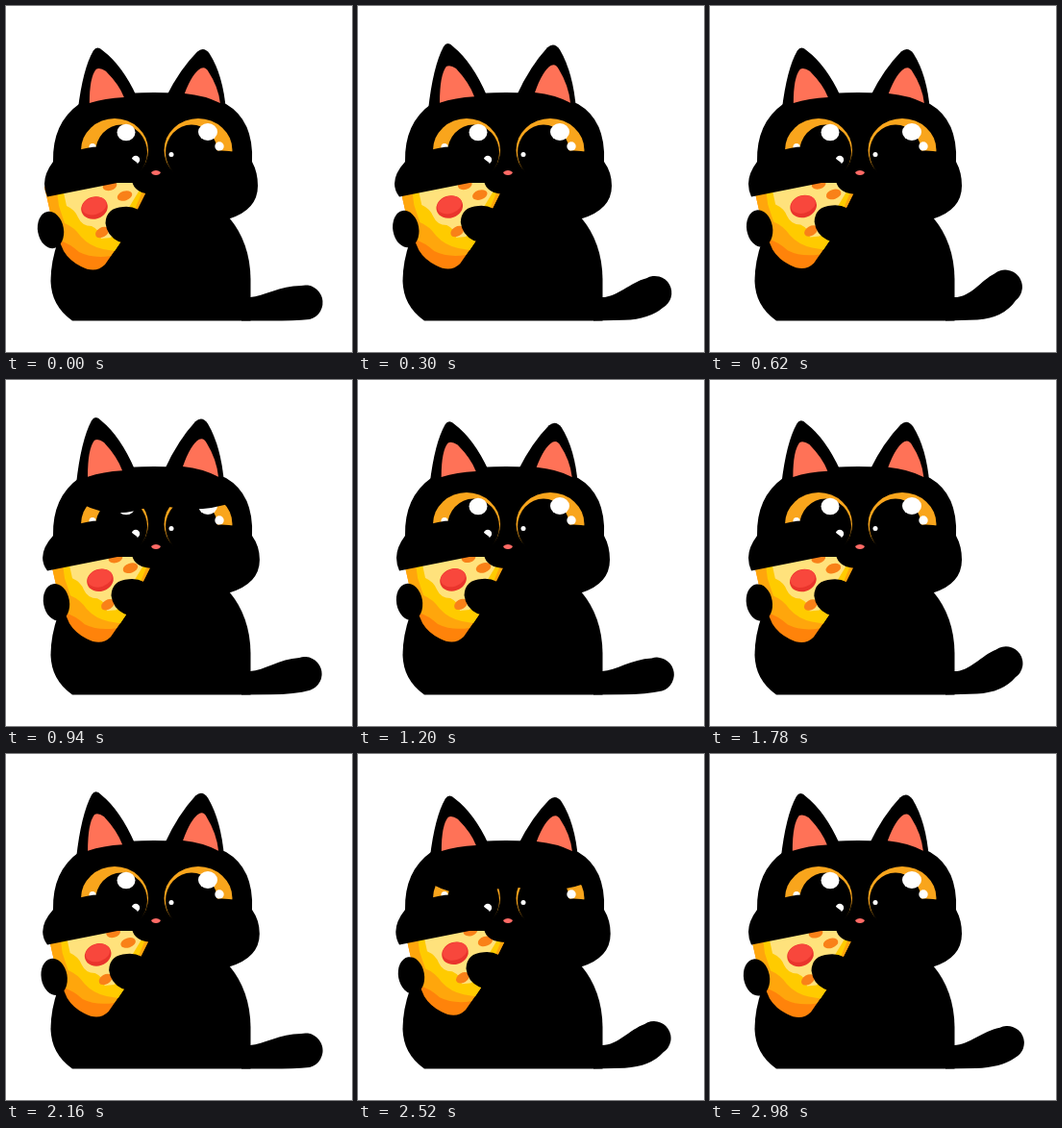
An HTML page that plays this animation: 360 px wide and 360 px high, repeating every 3 s.

```html
<!DOCTYPE html>
<html>
<head>
<meta charset="utf-8">
<style>
html, body { margin: 0; width: 100%; height: 100%; overflow: hidden; background: #fff; }
svg { display: block; width: 100vw; height: 100vh; }
</style>
</head>
<body>
<svg viewBox="0 0 360 360">
  <clipPath id="sockets">
    <ellipse cx="113" cy="150" rx="36" ry="34"/>
    <ellipse cx="200" cy="150" rx="36.5" ry="34"/>
  </clipPath>

  <path id="tail"/>
  <path d="M75 205Q47 245 46.5 286Q47 312 69 327.5H254.5V284Q254 246 232 220L150 190Z"/>

  <g id="pizza">
    <path fill="#ff830a" d="M40 188L50 232L60 255Q66 265 78 271Q93 279 103 269L121 243L146 193L130 170Z"/>
    <path fill="#ffa60c" d="M40 188L49 228L56 244Q66 247 76 256Q90 263 109 260L121 243L146 193L130 170Z"/>
    <path fill="#ffcb00" d="M52 185L55 208L61 226Q71 230 78 240Q87 250 101 253L113 255L121 243L143 190L130 170Z"/>
    <path fill="#ffe27c" d="M58 185L63 208Q72 212 75 220Q79 229 89 229Q98 233 99 242L109 241L141 188L130 170Z"/>
    <g fill="#f98118">
      <ellipse cx="123.5" cy="197.5" rx="8" ry="5" transform="rotate(-18 123.5 197.5)"/>
      <ellipse cx="108" cy="187" rx="7.5" ry="5" transform="rotate(-15 108 187)"/>
      <ellipse cx="100" cy="235.5" rx="7.5" ry="5" transform="rotate(-30 100 235.5)"/>
    </g>
    <g transform="rotate(-18 92 210)">
      <ellipse cx="92" cy="210" rx="14" ry="11.5" fill="#e9342c"/>
      <ellipse cx="92.5" cy="208" rx="13" ry="9" fill="#f8473c"/>
    </g>
    <ellipse cx="46.5" cy="233" rx="13.5" ry="19.3" transform="rotate(-10 46.5 233)"/>
    <path d="M122 209Q104 210 103.5 226Q105 239 117 245L150 255V212L138 212Q130 208 122 209Z"/>
  </g>

  <path id="head"/>

  <g id="ears">
    <path d="M75 108Q80 66 91 47Q95 41 101 47Q121 62 136 94V112H75Z"/>
    <path d="M167 112V94Q181 66 199 48Q206 42 212 50Q226 72 229 108V112Z"/>
    <g fill="#ff7257">
      <path d="M87 101Q87 74 94 66Q98 64 104 68Q118 82 123 95Q103 96 87 101Z"/>
      <path d="M186 91Q194 70 203 65Q208 63 211 69Q221 84 223 101Q207 93 186 91Z"/>
    </g>
  </g>

  <g fill="#f9a51c">
    <ellipse cx="113" cy="150" rx="35" ry="33"/>
    <ellipse cx="200" cy="150" rx="35.5" ry="33"/>
  </g>
  <ellipse cx="120" cy="152.5" rx="27" ry="29"/>
  <ellipse cx="193" cy="152.5" rx="27" ry="29"/>
  <g fill="#fff">
    <ellipse cx="125" cy="131.5" rx="9.5" ry="8.7"/>
    <circle cx="90" cy="146.5" r="3.5"/>
    <circle cx="135" cy="160" r="4.2"/>
    <ellipse cx="210" cy="131" rx="10" ry="9"/>
    <circle cx="222" cy="146" r="4.7"/>
    <circle cx="172" cy="154.5" r="2.5"/>
  </g>
  <path d="M70 152Q84 146 100 146.5Q120 148 133 160.500Q139 163 141 176V184H70Z"/>
  <path d="M240 152Q208 146 182 164Q174 168 172 178V184H240Z"/>
  <path id="lids" clip-path="url(#sockets)"/>
  <path fill="#ff6b66" d="M151 173Q156 169 161 173Q160 176 156 176Q152 176 151 173Z"/>
</svg>

<script>
const LOOP = 3000;
const el = id => document.getElementById(id);
const mix = (a, b, k) => a + (b - a) * k;
const wave = (t, period) => Math.cos(2 * Math.PI * t / period);

// Pizza offset at each half second, eased in between
const bites = [0, 5, 6, 9, 2, 9, 2];
function pizzaShift(t) {
  const i = Math.floor(t / 500);
  return mix(bites[i], bites[i + 1], (1 - wave(t % 500, 1000)) / 2);
}

function drawTail(t) {
  const u = (1 - wave(t, 1080)) * .58;
  const p = (x0, y0, x1, y1) => mix(x0, x1, u) + ' ' + mix(y0, y1, u);
  el('tail').setAttribute('d',
    `M245 304L254 303C${p(268, 302, 271, 303)} ${p(285, 291, 282, 286)} ${p(307, 291, 297, 279.5)}` +
    `A17.4 17.4 0 0 1 ${p(316, 326, 318, 308)}Q${p(300, 327.5, 305, 325)} ${p(275, 327.5, 278, 326.5)}L245 327.5Z`);
}

function drawHead(t) {
  const k = 1 - wave(t, 600), l = 40 - k, r = 262 + k;
  el('head').setAttribute('d',
    `M76 102Q100 90 154 90Q205 90 229 102Q258 119 256 162Q${r} 173 ${r} 187Q${r} 212 232 221.5` +
    `L160 225L158 196Q133 197 131 181L43 198.500Q${l} 192 ${l} 185Q${l} 174 49 162Q48 122 76 102Z`);
}

function drawLids(t) {
  const y = 92 + 47 * Math.exp(-(((t % 1500 - 1000) / 130) ** 2));
  el('lids').setAttribute('d',
    `M74 110V${y - 4}Q112 ${y + 18} 152 ${y}V110Z` +
    `M239 110V${y - 4}Q201 ${y + 10} 161 ${y}V110Z`);
}

function frame(now) {
  const t = now % LOOP;
  const dx = pizzaShift(t), tip = 41.3 + 2.3 * wave(t, 630);
  drawTail(t);
  drawHead(t);
  drawLids(t);
  el('pizza').setAttribute('transform', `translate(${dx} ${-dx * .3})`);
  el('ears').setAttribute('transform', `translate(${(tip - 44) * .4} 104) scale(1 ${(104 - tip) / 60}) translate(0 -104)`);
  requestAnimationFrame(frame);
}
frame(0);
</script>
</body>
</html>
```
